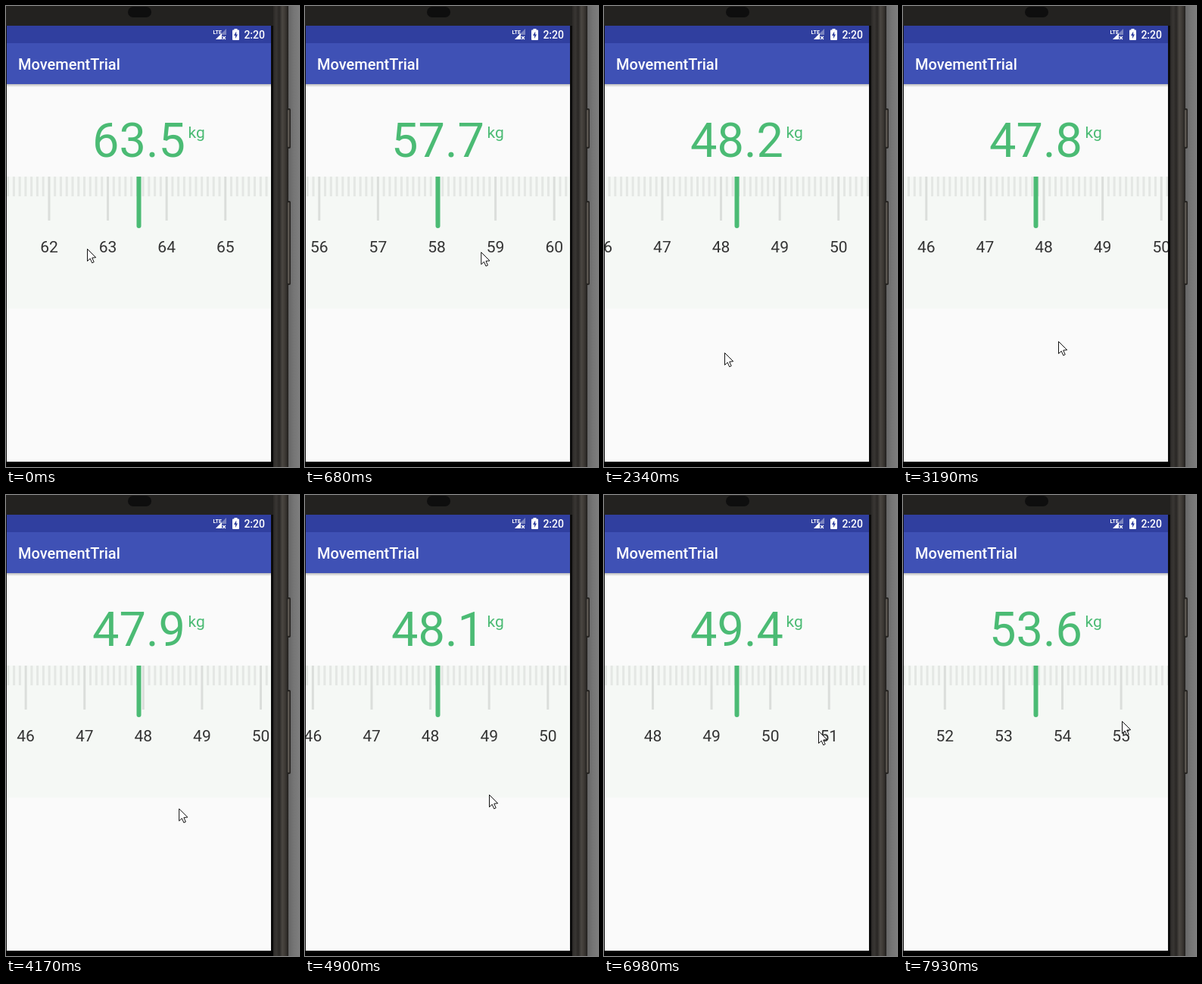
An HTML page with a canvas that plays this animation: 387 by 608 pixels, repeating every 7.99 s.

```html
<!DOCTYPE html>
<html lang="en">
<head>
<meta charset="utf-8">
<title>Weight ruler</title>
<style>
  html, body { margin: 0; height: 100%; overflow: hidden; background: #222; }
  canvas { display: block; }
</style>
</head>
<body>
<canvas id="stage" width="387" height="608"></canvas>
<script>
const LOOP = 7990, CENTER = 175.5, KG = 77.6, GREEN = '#4bbb74';
const c = document.getElementById('stage').getContext('2d');

// Turning points of the pointer: [ms, x, y]
const turns = [
  [0, 107, 320], [1410, 371, 329], [2340, 159, 457], [3190, 205, 442],
  [4900, 243, 395], [5500, 247, 376], [6780, 266, 388], [6980, 283, 311], [7930, 289, 298]
];

const clamp = u => Math.min(1, Math.max(0, u));
const smooth = u => u * u * (3 - 2 * u);

// A long fling that dies out, a small nudge, then an accelerating climb
function weightAt(t) {
  const fall = 15.7 * Math.exp(-1.5 * (t / 1410) ** 1.71);
  const nudge = .33 * smooth(clamp((t - 3600) / 1600));
  const climb = 1.19 * Math.max(0, t / 1000 - 5.95) ** 2.21;
  return 47.828 + fall + nudge + climb;
}

function cursorAt(t) {
  const i = Math.max(1, turns.findIndex(p => p[0] > t));
  if (t >= turns.at(-1)[0]) return turns.at(-1).slice(1);
  const [t0, x0, y0] = turns[i - 1], [t1, x1, y1] = turns[i];
  const u = smooth((t - t0) / (t1 - t0));
  return [x0 + (x1 - x0) * u, y0 + (y1 - y0) * u];
}

function box(x, y, w, h, fill, r = 0) {
  c.fillStyle = fill;
  c.beginPath();
  c.roundRect(x, y, w, h, r);
  c.fill();
}

function poly(points, fill, stroke) {
  c.beginPath();
  points.forEach(p => c.lineTo(...p));
  c.closePath();
  c.fillStyle = fill;
  c.fill();
  if (stroke) {
    c.strokeStyle = stroke;
    c.stroke();
  }
}

function text(s, x, y, size, fill, align = 'left', weight = 400) {
  c.font = `${weight} ${size}px Roboto, sans-serif`;
  c.textAlign = align;
  c.fillStyle = fill;
  c.fillText(s, x, y);
}

function gradient(x0, y0, x1, y1, ...colors) {
  const g = c.createLinearGradient(x0, y0, x1, y1);
  colors.forEach((color, i) => g.addColorStop(i / (colors.length - 1), color));
  return g;
}

function drawPhone() {
  box(0, 0, 387, 608, '#232220');
  box(161, 1, 31, 14, '#0e0e0e', 7);
  box(350, 26, 3, 582, '#0b0b0b');
  box(353, 0, 20, 608, gradient(353, 0, 373, 0,
    '#2b2927', '#393633', '#292725', '#4b4742', '#3b3733', '#22201e'));
  box(373, 0, 14, 608, gradient(373, 0, 387, 0, '#666', '#757575', '#7d7d7d'));
  for (const [y, h] of [[135, 53], [257, 111]]) {
    box(371, y, 5, h, '#262422', 2);
    box(372, y + 2, 2.5, h - 4, '#5a554f', 1);
  }
  box(0, 26, 1, 582, '#111');
  box(0, 601, 353, 7, '#000');
}

function drawBars() {
  box(1, 26, 349, 575, '#fafafa');
  box(1, 103, 349, 4, gradient(0, 103, 0, 107, '#00000040', '#00000000'));
  box(1, 26, 349, 23, '#303f9f');
  box(1, 49, 349, 54, '#3f51b5');
  text('MovementTrial', 16, 84, 20, '#fff', 'left', 500);
  text('2:20', 342, 43, 14, '#fff', 'right', 500);

  // Signal
  text('LTE', 273.5, 37, 7, '#fff', 'left', 700);
  poly([[277, 44], [291, 30], [291, 44]], '#7b84bf');
  poly([[277, 44], [285, 36], [285, 44]], '#fff');
  box(285, 38, 6, 6, '#303f9f');
  c.strokeStyle = '#fff';
  c.lineWidth = 1.2;
  c.beginPath();
  c.moveTo(286, 40); c.lineTo(290, 44);
  c.moveTo(290, 40); c.lineTo(286, 44);
  c.stroke();

  // Battery
  box(301.5, 30, 4, 3, '#fff');
  box(299, 31.5, 9, 13.5, '#fff', 1);
  poly([[304.2, 33.5], [301, 39], [303, 39], [303, 43], [306, 37.5], [304.2, 37.5]], '#303f9f');
}

function drawRuler(value) {
  c.save();
  c.beginPath();
  c.rect(1, 103, 349, 498);
  c.clip();
  box(1, 225, 349, 174, '#f5f8f5');
  // Only ticks centred on the screen are shown, with their labels.
  const reach = CENTER / KG + .01;
  for (let n = Math.ceil((value - reach) * 10); n <= (value + reach) * 10; n++) {
    const x = CENTER + (n / 10 - value) * KG, major = n % 10 === 0;
    box(x - 1.5, 225, 3, major ? 58 : 26, major ? '#dbdedb' : '#e4e7e4');
    if (major) text(n / 10, x, 325, 21, '#333', 'center');
  }
  box(CENTER - 3, 225, 6, 68, GREEN, [0, 0, 3, 3]);
  c.restore();
}

function drawCursor(x, y) {
  c.save();
  c.translate(x + .5, y + .5);
  c.lineWidth = 1;
  poly([[0, 0], [0, 16], [3.7, 12.6], [6.2, 18.3], [8.7, 17.2], [6.2, 11.6], [11.2, 11.2]], '#fff', '#111');
  c.restore();
}

function frame(now) {
  const t = now % LOOP;
  // The readout runs slightly ahead of the ruler.
  const shown = Math.floor(weightAt(t + 24) * 10) / 10;
  drawPhone();
  drawBars();
  drawRuler(weightAt(t));
  text(shown.toFixed(1), CENTER, 199, 63, GREEN, 'center');
  text('kg', 240.5, 174, 21, GREEN);
  drawCursor(...cursorAt(t));
  requestAnimationFrame(frame);
}
requestAnimationFrame(frame);
</script>
</body>
</html>
```
